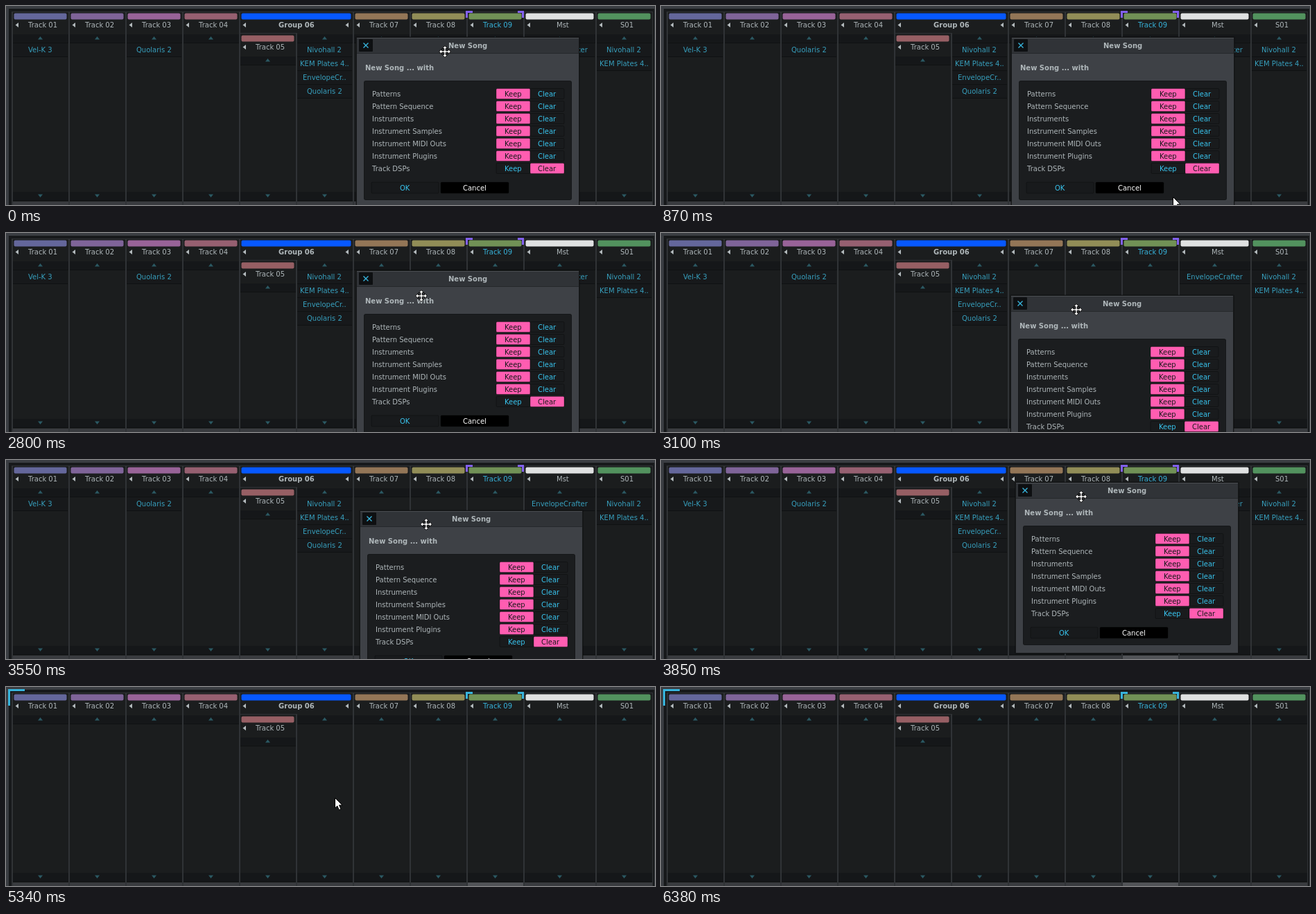
An HTML page for the animation above (6830 ms loop, 936 by 288 pixels).

```html
<!DOCTYPE html>
<html lang="en">
<head>
<meta charset="utf-8">
<title>New Song dialog</title>
<style>
html, body { margin: 0; width: 100%; height: 100%; overflow: hidden; background: #16181a; }
svg { display: block; width: 936px; height: 288px; }
text { font: 10px "DejaVu Sans", sans-serif; white-space: pre; }
.bold { font-weight: bold; }
</style>
</head>
<body>
<svg id="stage" viewBox="0 0 936 288" xmlns="http://www.w3.org/2000/svg"></svg>
<script>
const NS = "http://www.w3.org/2000/svg";
const CYAN = "#37b4dc", LINK = "#38c4ee", PINK = "#ff5db1", INK = "#17191b", TEXT = "#afb7ba";
const stage = document.getElementById("stage");

function add(parent, tag, attrs, content) {
  const el = document.createElementNS(NS, tag);
  for (const key in attrs) el.setAttribute(key, attrs[key]);
  if (content) el.textContent = content;
  parent.appendChild(el);
  return el;
}
const group = parent => add(parent, "g", {});
const rect = (p, x, y, width, height, fill, rx = 0) =>
  add(p, "rect", { x, y, width, height, fill, rx });
const path = (p, d, fill, extra) => add(p, "path", { d, fill, ...extra });
const show = (el, on) => el.setAttribute("visibility", on ? "visible" : "hidden");
const move = (el, x, y) => el.setAttribute("transform", `translate(${Math.round(x)} ${Math.round(y)})`);

// y is the vertical middle of the line
const label = (p, x, y, str, fill, bold) =>
  add(p, "text", { x, y: y + 4, fill, class: bold ? "bold" : "" }, str);
// Centred text starts on a whole pixel
function centered(p, x, y, str, fill, bold) {
  const el = label(p, 0, y, str, fill, bold);
  el.setAttribute("x", Math.round(x - el.getComputedTextLength() / 2));
  return el;
}

// ---- Mixer ----
const mixer = group(stage);
rect(mixer, 0, 0, 936, 288, "#3a3d42");
rect(mixer, 4, 4, 931, 284, INK);
rect(mixer, 8, 8, 925, 280, "#303336");

const leftTri = (x, y) => path(mixer, `M${x} ${y}l4.5 -3.5v7z`, "#b3babd");
// dir is 1 for a triangle pointing down, -1 for up
const foldTri = (x, y, dir) => path(mixer, `M${x - 3.5} ${y - 2 * dir}h7l-3.5 ${4.5 * dir}z`, "#2b5963");

function column(x, w, top, foot = "#393b3f") {
  const mid = x + w / 2 - 0.5;
  rect(mixer, x, top, w, 283 - top, "#1b1d1e");
  for (const [y, dir] of [[top, -1], [269, 1]]) {
    rect(mixer, x, y, w, 12, "#151719");
    rect(mixer, x, y + 12, w, 1, "#101213");
    foldTri(mid, y + 5.5, dir);
  }
  rect(mixer, x, 283, w, 5, foot);
}
function header(x, w, y, name, color, fill = TEXT, bold = false) {
  rect(mixer, x, y - 2, w, 32, "#1b1d1e");
  rect(mixer, x + 1.5, y - 0.5, w - 4, 9, color, 2);
  leftTri(x + 3.5, y + 16.5);
  centered(mixer, x + w / 2 + (bold ? 0 : 3.5), y + 16, name, fill, bold);
}
function track(x, w, name, color, active) {
  column(x, w, 41, active ? "#515357" : undefined);
  header(x, w, 11, name, color, active ? CYAN : TEXT);
}

const slot = n => 10 + 82 * (n - 1);
const tints = ["#64679b", "#7f6499", "#986398", "#966071", "#965f64", "", "#937657", "#918d57", "#719156"];
for (const n of [1, 2, 3, 4, 7, 8, 9]) track(slot(n), 80, "Track 0" + n, tints[n - 1], n === 9);
track(slot(10), 102, "Mst", "#dfe1e1");
track(852, 80, "S01", "#52925e");

column(slot(5), 80, 73);
column(slot(6), 80, 41);
header(slot(5), 162, 11, "Group 06", "#0758ff", TEXT, true);
leftTri(489.5, 27.5);
rect(mixer, 338, 39, 81, 1, "#303336");
rect(mixer, 418, 39, 2, 46, "#303336");
header(slot(5), 80, 43, "Track 05", tints[4]);

// ---- Devices ----
const devices = group(stage);
function chain(x, w, ...names) {
  names.forEach((name, i) => {
    const y = 54 + i * 20;
    rect(devices, x, y, w, 19, INK);
    rect(devices, x, y + 19, w, 1, "#0f1112");
    centered(devices, x + w / 2 - 0.5, y + 9, name, "#379fbd");
  });
}
chain(slot(1), 79, "Vel-K 3");
chain(slot(3), 79, "Quolaris 2");
chain(slot(6), 79, "Nivohall 2", "KEM Plates 4..", "EnvelopeCr..", "Quolaris 2");
chain(slot(10), 101, "EnvelopeCrafter");
chain(852, 79, "Nivohall 2", "KEM Plates 4..");

// ---- Focus marks ----
const bracket = path(stage, "M664.5 17V8.5H673M738 8.5H745.5V17", "none", { "stroke-width": 3 });
const corner = path(stage, "M4.5 27V4.5H27", "none", { stroke: CYAN, "stroke-width": 3 });

// ---- Dialog ----
const dialog = group(stage);
rect(dialog, 504, 44, 324, 250, "rgba(0,0,0,.25)", 2);
rect(dialog, 505, 45, 322, 248, "#17191a", 1);
rect(dialog, 506, 46, 320, 246, "#3e4146");
rect(dialog, 506, 46, 320, 22, "#303337");
rect(dialog, 506, 46, 320, 1, "#4a4d51");
rect(dialog, 506, 68, 320, 1, "#25282b");
rect(dialog, 509, 48, 20, 18, "#0e1012", 1);
path(dialog, "M515.5 53.5l7 7m0 -7l-7 7", "none", { stroke: CYAN, "stroke-width": 1.4 });
centered(dialog, 666, 57, "New Song", TEXT, true);
label(dialog, 518, 89, "New Song ... with", TEXT, true);
rect(dialog, 516, 108, 300, 173, "#151719", 3);
rect(dialog, 517, 109, 298, 171, "#1b1d1f", 2);

function button(x, y, w, h, str, fill, color) {
  const face = rect(dialog, x, y, w, h, fill, 1.5);
  face.setAttribute("stroke", "rgba(0,0,0,.3)");
  return { face, text: centered(dialog, x + w / 2 - 0.5, y + h / 2, str, color) };
}
const choice = (x, y, str, on) =>
  button(x, y - 7, 49, 15, str, on ? PINK : "#191b1d", on ? INK : LINK);

["Patterns", "Pattern Sequence", "Instruments", "Instrument Samples",
 "Instrument MIDI Outs", "Instrument Plugins", "Track DSPs"].forEach((name, i) => {
  const y = 127 + i * 18, clear = i === 6;
  label(dialog, 528, y, name, TEXT);
  choice(707, y - 0.5, "Keep", !clear);
  choice(756, y - 0.5, "Clear", clear);
});
const ok = button(527, 255, 97, 16, "OK", "#181a1c", LINK);
button(627, 255, 98, 16, "Cancel", "#000", "#fff");

// ---- Pointers ----
const outline = { stroke: "#000", "stroke-width": 1, "stroke-linejoin": "round" };
const arrow = path(stage, "M-.5 -.5V14.2L2.8 11.1L5.3 16.8L8 15.6L5.5 10H10Z", "#fff", outline);
const arm = "M0 -8.5L3.8 -4.5H1.2V-1.2H4.5V-3.8L8.5 0L4.5 3.8V1.2H1.2V4.5H3.8" +
  "L0 8.5L-3.8 4.5H-1.2V1.2H-4.5V3.8L-8.5 0L-4.5 -3.8V-1.2H-1.2V-4.5H-3.8Z";
const mover = path(stage, arm, "#fff", outline);

const TICKS = 46, LOOP = 6830, TICK = LOOP / TICKS, LEAD = 30;
const GRAB = 17, DROP = 27, PRESS = 33, CLOSE = 34, CLEARED = 35;

// A stroke runs from the last resting point to `to`, bent towards `via`
const pointerPath = [
  { from: 0, end: 8, to: [777, 238], via: [700, 370] },
  { from: 8, end: 9, to: [782, 238] },
  { from: 10, end: 14, to: [583, 265], via: [640, 275], ease: 3 },
  { from: 15, end: 17, to: [600, 66] },
  { from: 18, end: 21, to: [599, 111], ease: 2 },
  { from: 23, end: 26, to: [606, 53], via: [614, 85] },
  { from: 27, end: 32, to: [587, 252] },
  { from: 35, end: 41, to: [934, 195], via: [150, -70] },
  { from: 42, end: 43, to: [940, 195] }
];
const dialogPath = [
  { from: 18, end: 21, to: [-1, 45], ease: 0.55 },
  { from: 23, end: 26, to: [6, -13], via: [11, 21] }
];

function along(strokes, rest, tick) {
  for (const { from, end, to, via, ease = 1 } of strokes) {
    if (tick <= from) break;
    const u = Math.min(1, (tick - from) / (end - from));
    const e = 1 - (1 - u) ** ease;
    const start = rest;
    rest = to.map((b, i) => {
      const a = start[i], c = via ? via[i] : (a + b) / 2;
      return a * (1 - e) ** 2 + 2 * c * e * (1 - e) + b * e * e;
    });
  }
  return rest;
}

function draw(t) {
  const tick = Math.floor((t + LEAD) / TICK);
  const [x, y] = along(pointerPath, [633, 66], tick);
  const [dx, dy] = along(dialogPath, [0, 0], tick);
  const open = tick < CLOSE, pressed = tick >= PRESS;
  const px = x - dx, py = y - dy;
  const dragging = tick >= GRAB && tick <= DROP;
  const onTitle = open && (dragging || (py > 45 && py < 69));
  const over = px >= 527 && px < 624 && py >= 255 && py < 271;

  show(dialog, open);
  move(dialog, dx, dy);
  ok.face.setAttribute("fill", pressed ? PINK : over ? "#22282b" : "#181a1c");
  ok.text.setAttribute("fill", pressed ? INK : LINK);
  show(devices, tick < CLEARED);
  show(corner, !open);
  bracket.setAttribute("stroke", open ? "#8261ee" : CYAN);
  show(mover, onTitle);
  show(arrow, !onTitle);
  move(mover, x, y);
  move(arrow, x, y);
}

const start = performance.now();
function frame() {
  draw((performance.now() - start) % LOOP);
  requestAnimationFrame(frame);
}
draw(0);
requestAnimationFrame(frame);
</script>
</body>
</html>
```
